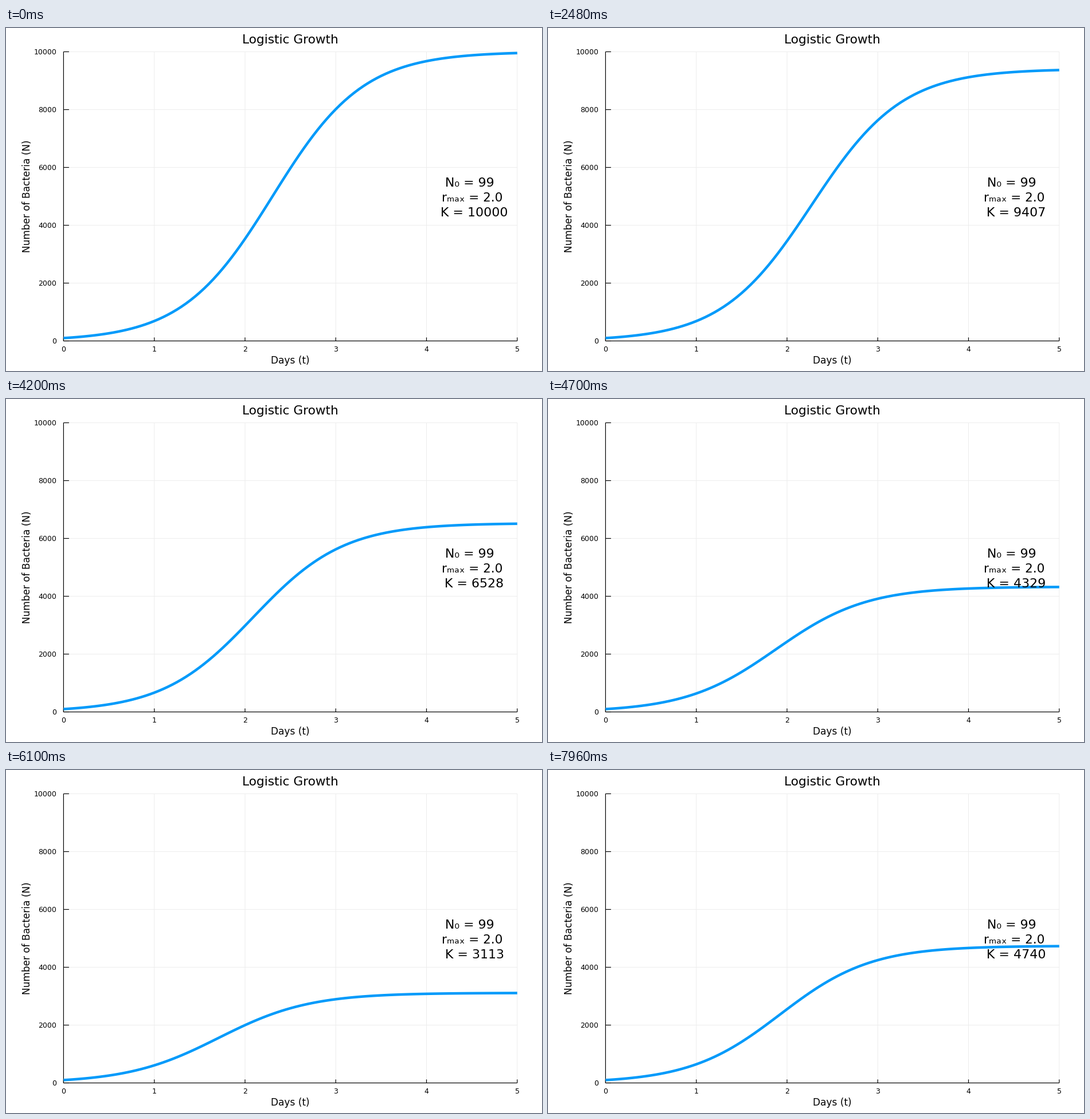
Recreate the animation shown at these times as a matplotlib script. Size 935x599 px, loop 8 s.

```python
import numpy as np
import matplotlib.pyplot as plt
from matplotlib.animation import FuncAnimation
from matplotlib.collections import LineCollection

WIDTH, HEIGHT, DPI = 935, 599, 100
LOOP_MS, STEP_MS = 8000, 20
LEFT, RIGHT, TOP, BOTTOM = 100.4, 891.8, 41.5, 546.5
N0, RATE, DAYS, N_MAX = 99, 2.0, 5, 10000
TICK = 0.012  # tick length as a share of the axis it points along

# The slider starts moving at START_MS and the plot refreshes every REFRESH_MS.
START_MS, REFRESH_MS = 500, 60
KEY_TIMES = np.array([500, 1580, 2240, 3320, 3860, 4160, 4760, 5300, 5840, 6860, 7940])
KEY_K = np.array([9962, 9644, 9487, 8884, 8088, 6528, 4160, 3355, 3100, 3576, 4740])
KEY_SLOPES = np.gradient(KEY_K, KEY_TIMES)


def slider(t):
    """Smooth cubic path through the key points."""
    i = min(np.searchsorted(KEY_TIMES, t, side="right"), len(KEY_TIMES) - 1) - 1
    h = KEY_TIMES[i + 1] - KEY_TIMES[i]
    u = (t - KEY_TIMES[i]) / h
    ease = u * u * (3 - 2 * u)
    bend = u * (1 - u) * ((1 - u) * KEY_SLOPES[i] - u * KEY_SLOPES[i + 1])
    return KEY_K[i] + (KEY_K[i + 1] - KEY_K[i]) * ease + h * bend


def capacity(t):
    if t < START_MS:
        return N_MAX
    refreshed = t - (t - START_MS) % REFRESH_MS
    return round(slider(refreshed))


def logistic(t, k):
    growth = np.exp(RATE * t)
    return k * N0 * growth / (k + N0 * (growth - 1))


def px(size):
    return size * 72 / DPI


def x_pos(t):
    return LEFT + (RIGHT - LEFT) * t / DAYS


def y_pos(n):
    return BOTTOM - (BOTTOM - TOP) * n / N_MAX


plt.rcParams["font.family"] = "DejaVu Sans"
fig = plt.figure(figsize=(WIDTH / DPI, HEIGHT / DPI), dpi=DPI, facecolor="white")
ax = fig.add_axes([0, 0, 1, 1])
ax.set(xlim=(0, WIDTH), ylim=(HEIGHT, 0))
ax.axis("off")


def label(x, y, text, size, ha="center", **kw):
    return ax.text(x, y, text, fontsize=px(size), ha=ha, va="baseline",
                   color="black", **kw)


def segments(lines, color, width, zorder):
    lines = LineCollection(lines, colors=color, linewidths=px(width), zorder=zorder)
    lines.set_snap(False)
    ax.add_collection(lines)


x_ticks = [x_pos(d) for d in range(DAYS + 1)]
y_ticks = [y_pos(n) for n in range(0, N_MAX + 1, 2000)]
x_tick_end = BOTTOM - TICK * (BOTTOM - TOP)
y_tick_end = LEFT + TICK * (RIGHT - LEFT)

segments([[(x, TOP), (x, BOTTOM)] for x in x_ticks]
         + [[(LEFT, y), (RIGHT, y)] for y in y_ticks], "#ededed", 1, 1)
segments([[(LEFT, TOP), (LEFT, BOTTOM)], [(LEFT, BOTTOM), (RIGHT, BOTTOM)]]
         + [[(x, BOTTOM), (x, x_tick_end)] for x in x_ticks]
         + [[(LEFT, y), (y_tick_end, y)] for y in y_ticks], "black", 1.2, 2)

for day, x in enumerate(x_ticks):
    label(x, 565, str(day), 12.5)
for i, y in enumerate(y_ticks):
    label(88.3, y + 4.5, str(2000 * i), 12.5, ha="right")

label(496, 27, "Logistic Growth", 21.7)
label(495.5, 586, "Days (t)", 17)
label(42.5, 294, "Number of Bacteria (N)", 17, rotation=90, rotation_mode="anchor")
label(808.5, 277, "N₀ = 99", 22, zorder=4)
label(813, 303, "rₘₐₓ = 2.0", 21.6, zorder=4)
k_text = label(817, 329, "", 22.2, zorder=4)

days = np.linspace(0, DAYS, 101)
curve, = ax.plot(x_pos(days), y_pos(days), color="#009afa", lw=px(4.5),
                 solid_capstyle="butt", zorder=3)


def draw(frame):
    k = capacity(frame * STEP_MS)
    curve.set_ydata(y_pos(logistic(days, k)))
    k_text.set_text(f"K = {k}")
    return curve, k_text


animation = FuncAnimation(fig, draw, frames=LOOP_MS // STEP_MS, interval=STEP_MS,
                          repeat=True, repeat_delay=0)
plt.show()
```
